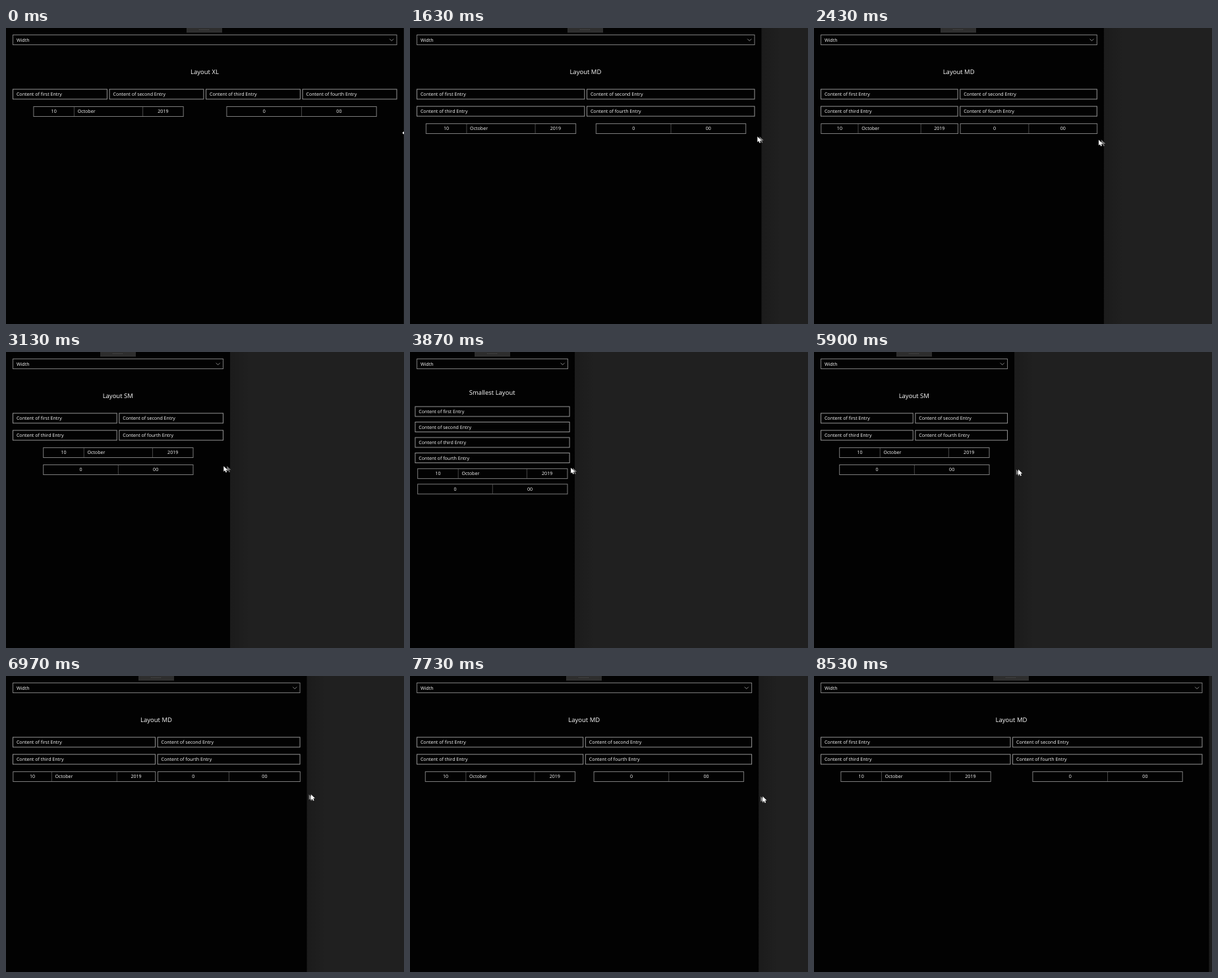
Write an HTML page that moves like this. It is 604 px wide and 450 px high and loops after 9.31 s.

```html
<!DOCTYPE html>
<html lang="en">
<head>
<meta charset="utf-8">
<title>Responsive layout</title>
<style>
  html, body { margin: 0; width: 100%; height: 100%; overflow: hidden; background: #202020; }
  svg { display: block; width: 604px; height: 450px; }
  text { font: 7.1px "Open Sans", "Noto Sans", sans-serif; fill: #fff; text-rendering: geometricPrecision; }
  .title { font-size: 9.5px; }
  .mid { text-anchor: middle; }
  .box { fill: none; stroke: #7c7c7c; }
  .entry { stroke: #959595; }
  .split { stroke: #484848; }
  .chevron { fill: none; stroke: #aaa; stroke-width: .8; }
  .pointer { fill: #fff; }
</style>
</head>
<body>
<svg viewBox="0 0 604 450">
  <defs>
    <linearGradient id="shade">
      <stop offset="0" stop-opacity=".15"/>
      <stop offset="1" stop-opacity="0"/>
    </linearGradient>
  </defs>
  <g id="stage"></g>
</svg>
<script>
const LOOP = 9310;
const LAG = 65;          // the window edge trails the pointer
const MIN_WIDTH = 250;
const PICKER = 227.3;

// [time, position] turning points of the drag
const dragX = [
  [605, 603.5], [665, 602], [805, 602], [1565, 533.5], [2365, 440], [3800, 250],
  [4330, 210], [4670, 210], [5835, 304], [6905, 456.5], [8405, 599.5]
];
const dragY = [[870, 159.5], [2430, 170], [3870, 176], [6970, 180], [8405, 187]];

// Smooth curve through the points that never overshoots them
function along(path, t) {
  const last = path.length - 1;
  if (t <= path[0][0]) return path[0][1];
  if (t >= path[last][0]) return path[last][1];
  const slope = i => (path[i + 1][1] - path[i][1]) / (path[i + 1][0] - path[i][0]);
  const tangent = i => {
    if (i === 0 || i === last) return slope(Math.min(i, last - 1));
    const a = slope(i - 1), b = slope(i);
    return a * b <= 0 ? 0 : Math.abs(a) < Math.abs(b) ? a : b;
  };
  const i = path.findIndex(p => p[0] > t) - 1;
  const [t0, v0] = path[i], [t1, v1] = path[i + 1];
  const h = t1 - t0, u = (t - t0) / h, r = 1 - u;
  return v0 + (v1 - v0) * u * u * (3 - 2 * u) +
    h * u * r * (r * tangent(i) - u * tangent(i + 1));
}

const layouts = [
  { from: 600, title: "Layout XL", cols: 4, pickerCols: 2 },
  { from: 400, title: "Layout MD", cols: 2, pickerCols: 2 },
  { from: 300, title: "Layout SM", cols: 2, pickerCols: 1 },
  { from: 0, title: "Smallest Layout", cols: 1, pickerCols: 1, small: true }
];
const entries = ["first", "second", "third", "fourth"].map(n => `Content of ${n} Entry`);

const text = (x, y, s, cls = "") => `<text x="${x}" y="${y}" class="${cls}">${s}</text>`;
const box = (x, y, w, cls = "") => `<rect x="${x}" y="${y}" width="${w}" height="15" class="box ${cls}"/>`;
const split = (x, y) => `<path d="M${x} ${y + .5}v14" class="split"/>`;

function datePicker(x, y, w) {
  const a = x + w * 78 / 288, b = x + w * 210 / 288, base = y + 9.7;
  return split(a, y) + split(b, y) + box(x, y, w) +
    text((x + a) / 2, base, "10", "mid") + text(a + 5.2, base, "October") +
    text((b + x + w) / 2, base, "2019", "mid");
}

function timePicker(x, y, w) {
  const base = y + 9.7;
  return split(x + w / 2, y) + box(x, y, w) +
    text(x + w / 4, base, "0", "mid") + text(x + w * .75, base, "00", "mid");
}

function toolbar(w) {
  const x = Math.round(w / 2 - 27.5);
  return `<rect x="${x}" width="54" height="7" fill="#2e2e2e"/>
    <path d="M${x + 19} 2.5h16" stroke="#505050" stroke-dasharray="1 1"/>`;
}

function combo(w) {
  return box(10.5, 10.5, w - 21) + text(16, 20.5, "Width") +
    `<path d="M${w - 21.3} 16.6l3 3 3-3" class="chevron"/>`;
}

function form(w) {
  const { title, cols, pickerCols, small } = layouts.find(l => w >= l.from);
  const top = small ? 83 : 93.1, row = small ? 23.5 : 26;
  const edge = small ? 6.1 : 8.7, gap = 3.6;
  const cell = (i, n) => ({
    x: edge + gap / 2 + (i % n) * (w - 2 * edge) / n,
    y: top + Math.floor(i / n) * row,
    w: (w - 2 * edge) / n - gap
  });

  let out = text(w / 2 - .3, small ? 65 : 70, title, "title mid");
  entries.forEach((label, i) => {
    const c = cell(i, cols);
    out += box(c.x, c.y, c.w, "entry") + text(c.x + 5.4, c.y + 10, label);
  });
  const below = row * entries.length / cols + .4;
  [datePicker, timePicker].forEach((picker, i) => {
    const c = cell(i, pickerCols);
    const pw = Math.min(PICKER, c.w);
    out += picker(c.x + (c.w - pw) / 2 + .3, c.y + below, pw);
  });
  return out;
}

function arrow(t, opacity) {
  return `<path class="pointer" opacity="${opacity}"
    transform="translate(${along(dragX, t)} ${along(dragY, t)})"
    d="M0 0V8.4L2 6.7 3.3 9.8 4.8 9.1 3.5 6.1H6.2Z"/>`;
}

const resizeTip = (x, y) => `<path class="pointer" d="M${x} ${y}l3-2.5v5z"/>`;

function pointer(t) {
  if (t < 870) return resizeTip(601.3, 159.5);
  if (t < 8400) return arrow(t - 33, .45) + arrow(t, 1);
  return t < 8530 ? resizeTip(602.8, 187) : "";
}

const stage = document.getElementById("stage");

function draw(t) {
  const w = Math.max(MIN_WIDTH, along(dragX, t - LAG));
  stage.innerHTML =
    `<rect width="604" height="450" fill="#202020"/>
     <rect x="${w}" width="30" height="450" fill="url(#shade)"/>
     <rect width="${w}" height="450" fill="#020202"/>` +
    toolbar(w) + combo(w) + form(w) + pointer(t);
}

const start = performance.now();
function tick() {
  draw((performance.now() - start) % LOOP);
  requestAnimationFrame(tick);
}
tick();
</script>
</body>
</html>
```
